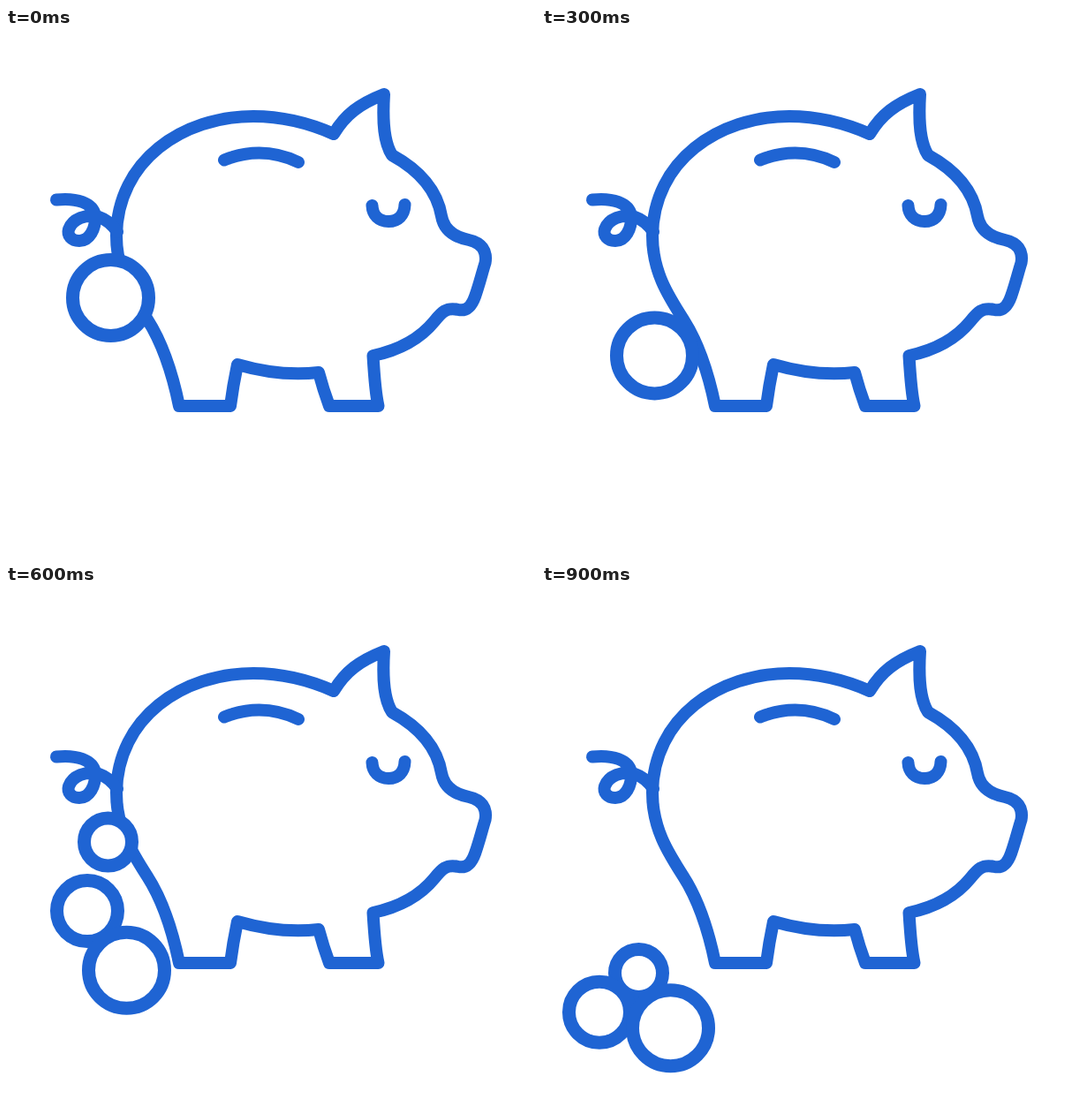
Recreate the animation shown at these times as an HTML page. Size 600 px wide and 599 px high, loop 1 s.

```html
<!DOCTYPE html>
<html lang="en">
<head>
<meta charset="utf-8">
<title>Piggy bank</title>
<style>
  html, body { margin: 0; width: 100%; height: 100%; overflow: hidden; background: #fff; }
  svg { display: block; width: 100%; height: 100%; }
  g { stroke: #1f64d3; stroke-linecap: round; stroke-linejoin: round; }
</style>
</head>
<body>
<svg viewBox="0 0 600 599">
  <g fill="none" stroke-width="14">
    <path d="M196 428 H254 Q257 405 262 381 Q310 395 354 390 Q359 409 366 428
      H421.5 Q418 413 415.5 371 C444 365 467 354 485 332 C493 322 498 316 512 319
      C522 321 527 315 531 304 C536 290 539 277 542.5 266 C545 252 538 243 524 240
      C509 237 496 230 493 213 C488 184 468 161 437 144 C428 130 426 108 428 75
      C400 86 384 98 371 120 C344 108 312 100 280 100 C200 100 126 150 125 235
      C125 275 142 302 160 330 C178 358 189 394 196 428 Z"/>
    <path d="M57 194.500 C80 192 98 198 101 212 C102 228 94 241 83 241
      C74 241 69 235 71 228 C75 216 91 210 105 214 C114 217 121 223 126 231"/>
    <path d="M247 149.500 Q290 132.500 331 152"/>
    <path d="M414.500 201 C415 212 422 219 433 219 C444 219 451 212 451.500 200"/>
  </g>
  <g id="coins" fill="#fff" stroke-width="15"></g>
</svg>
<script>
  const LOOP = 1000, STEP = 100;

  // Start position, shift per step, radius and the step at which each coin appears.
  // Later entries are painted on top.
  const coins = [
    { x: 115.5, y: 291, dx: -2, dy: 49.5, r: 27, from: 6 },
    { x: 110, y: 292.7, dx: -9, dy: 38.2, r: 34.5, from: 4 },
    { x: 118.5, y: 305.5, dx: 3, dy: 21.8, r: 43, from: 0 }
  ];

  const layer = document.getElementById('coins');
  for (const coin of coins) {
    coin.el = document.createElementNS('http://www.w3.org/2000/svg', 'circle');
    coin.el.setAttribute('r', coin.r);
    layer.appendChild(coin.el);
  }

  function draw(time) {
    const step = Math.floor((time % LOOP) / STEP);
    for (const { el, x, y, dx, dy, from } of coins) {
      const n = step - from;
      el.setAttribute('visibility', n < 0 ? 'hidden' : 'visible');
      el.setAttribute('cx', x + dx * n);
      el.setAttribute('cy', y + dy * n);
    }
  }

  let start = null;
  function tick(now) {
    if (start === null) start = now;
    draw(now - start);
    requestAnimationFrame(tick);
  }
  draw(0);
  requestAnimationFrame(tick);
</script>
</body>
</html>
```
